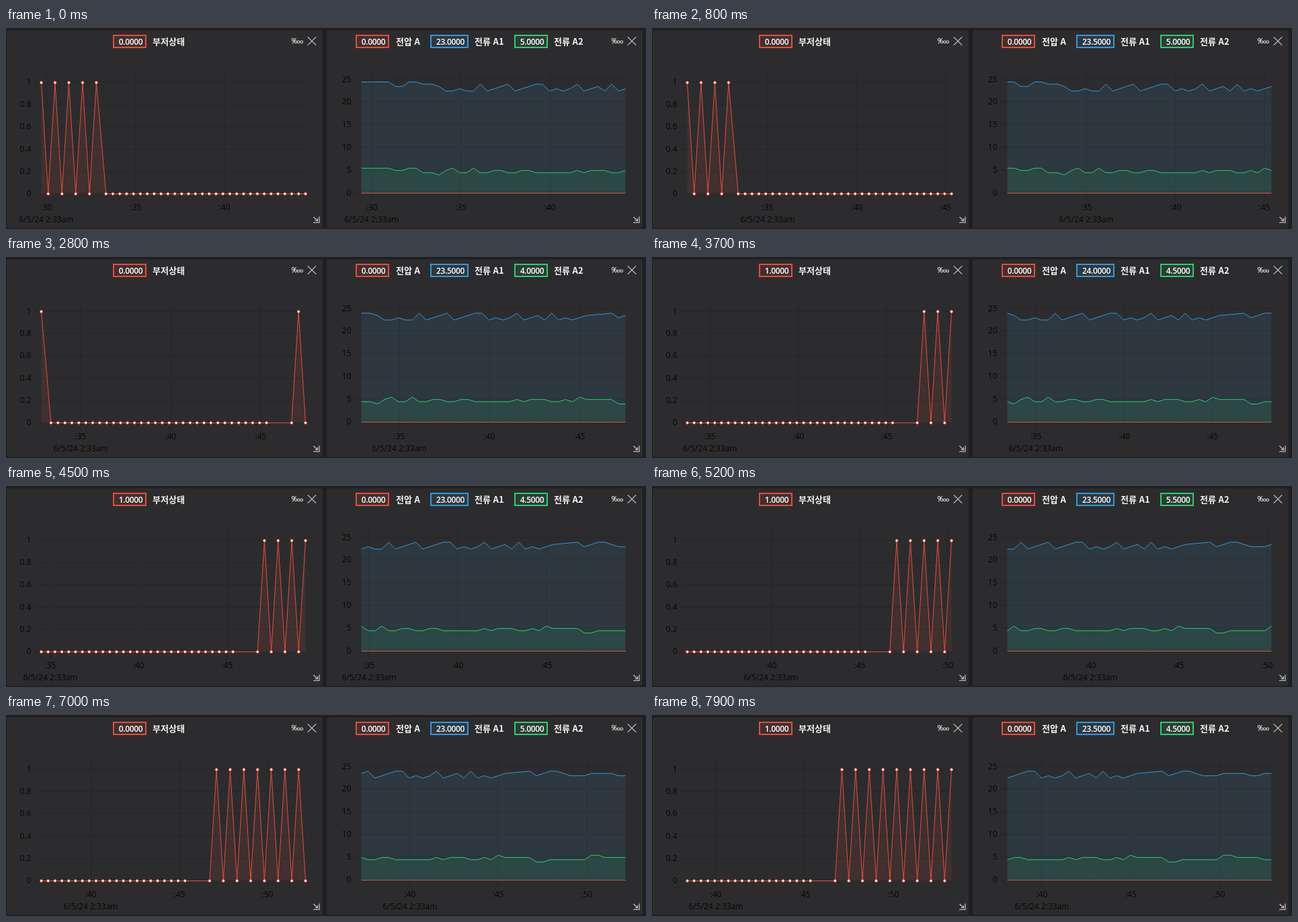
An HTML page that plays this animation: 952 by 300 pixels, repeating every 8000 ms.

```html
<!DOCTYPE html>
<html lang="ko">
<head>
<meta charset="utf-8">
<style>
html, body { margin: 0; width: 100%; height: 100%; overflow: hidden; background: #1f1f21; }
svg { display: block; }
text { font-family: "Open Sans", "Noto Sans CJK KR", "Noto Sans CJK", sans-serif; }
.axis { font-size: 12px; fill: #060606; }
.mid { text-anchor: middle; }
.end { text-anchor: end; }
.value { font-size: 12px; font-weight: 600; letter-spacing: -.35px; fill: #fff; text-anchor: middle; }
.name { font-family: "Noto Sans CJK KR", "Noto Sans CJK", "Open Sans", sans-serif; font-size: 13px; font-weight: 700; fill: #f4f4f4; }
.grid { stroke: #000; stroke-opacity: .09; stroke-width: 2; fill: none; }
.icon { stroke: #c8c8c8; stroke-width: 1.2; fill: none; }
</style>
</head>
<body>
<svg id="stage" width="952" height="300" viewBox="0 0 952 300"></svg>
<script>
const LOOP = 8000, SPAN = 15, WIDTH = 393, TOP = 64.5;
const SPEED = 1 / 900;    // seconds of data per ms of playback
const RED = '#e74c3c', BLUE = '#3498db', GREEN = '#2ecc71';

// readings fall into three runs, with a pause before each later run
const SECOND = 10, THIRD = 42;
const halves = v => Math.round(v * 2) / 2;
const dip = i => Math.abs(i - 5.5) < 1 ? 1 : 0;

// the buzzer beeps in the first and third run
const buzzer = i => i < SECOND ? i % 2 : i < THIRD ? 0 : (i - THIRD) % 2;

// plateau with a dip, then ramps that fall back, then a fading wave
const resets = [12, 13, 15, 16, 18, 22, 27, 29, 32, 35, 37, 39];
const spikes = [17, 31, 36];
function currentA1(i) {
  if (i < 12) return halves(24.5 - dip(i) - .3 * Math.max(0, i - 8));
  if (spikes.includes(i)) return 24;
  if (i <= THIRD) return Math.min(24, 22.5 + .5 * (i - resets.findLast(r => r <= i)));
  const fade = .5 * Math.exp((45 - i) / 12);
  return halves(23.38 + fade * Math.cos((i - 45.5) / 6.7 * 2 * Math.PI));
}

// two levels that swap at the toggles, with a few steps above and below
const toggles = [0, 9, 12, 14, 16, 17, 19, 21, 23, 25, 31, 32, 33, 36, 38, 39, 40, 43, 51, 57];
const above = [13, 16, 40, 51, 52], below = [11, 43, 44];
function currentA2(i) {
  const level = 4.5 + .5 * (toggles.filter(t => t <= i).length % 2);
  if (i < 9) return level + .5 - .5 * dip(i);
  return level + .5 * above.includes(i) - .5 * below.includes(i);
}

// seconds past the minute at which a reading was taken
function stamp(p, i) {
  if (i < SECOND) return p.start + p.step * i;
  return p.delay + (i < THIRD ? 33.34 + .3867 * (i - SECOND) : 46.72 + .387 * (i - THIRD));
}

const left = {
  x: 0, x0: 52.5, base: 247.5, dots: true,
  start: 29.317, step: .387, delay: 0, clock: 44.556,
  unit: 166, mark: .2,
  series: [{ color: RED, at: buzzer, box: 160, name: '부저상태', nameX: 218 }]
};
const right = {
  x: 476, x0: 528.5, base: 246.5, dots: false,
  start: 29.43, step: .383, delay: .05, clock: 44.5,
  unit: 6.776, mark: 5,
  series: [
    { color: RED, at: () => 0, box: 521, name: '전압 A', nameX: 580 },
    { color: BLUE, at: currentA1, box: 632, name: '전류 A1', nameX: 697 },
    { color: GREEN, at: currentA2, box: 757, name: '전류 A2', nameX: 815 }
  ]
};

const label = (x, y, cls, s) => `<text class="${cls}" x="${x}" y="${y}">${s}</text>`;
const path = (d, attrs) => `<path d="${d}" ${attrs}/>`;
const circle = (x, y, r, attrs = '') => `<circle cx="${x.toFixed(2)}" cy="${y}" r="${r}" ${attrs}/>`;

function frame(x) {
  const rings = [431, 435.4, 439.8].map(cx => circle(cx, 20.8, 1.8)).join('');
  return `<rect x="${x + 1}" y="3.5" width="470" height="295" rx="3" fill="#2c2c2e"/>
    <g class="icon" transform="translate(${x})">${circle(427, 17.5, 1.8)}${rings}
    <path d="M431.5 15L426 23.5M448.8 13.3L461.2 25.7M461.2 13.3L448.8 25.7"/>
    <path d="M457.5 282L463.5 288M463.5 284V288H459.5M466 281.5V290.5H457"/></g>`;
}

function legend(s, value) {
  const text = value.toFixed(4), w = text.length > 6 ? 55 : 48;
  return `<rect x="${s.box}" y="11" width="${w}" height="18" fill="${s.color}" fill-opacity=".1" stroke="${s.color}" stroke-width="2"/>`
    + label(s.box + w / 2 + 1.5, 24.5, 'value', text) + label(s.nameX, 24.5, 'name', s.name);
}

function axes(p, start, end, px, py) {
  let grid = '', labels = '';
  for (let k = 0; k <= 5; k++) {
    const y = Math.round(py(k * p.mark) - .5);
    grid += `M${p.x0 - 10} ${y}H${p.x0 + WIDTH}`;
    labels += label(p.x0 - 15, y + 4, 'axis end', +(k * p.mark).toFixed(1));
  }
  const first = Math.ceil(start / 5) * 5;
  for (let t = first; t <= end; t += 5) {
    const x = Math.round(px(t));
    grid += `M${x} ${TOP}V257`;
    labels += label(x, 272, 'axis mid', ':' + t);
  }
  return path(grid, 'class="grid"') + labels
    + label(Math.round(px(first)), 290, 'axis mid', '6/5/24 2:33am');
}

function plot(p, s, from, last, px, py) {
  const pts = [];
  for (let i = from; i <= last; i++) pts.push([px(stamp(p, i)), py(s.at(i))]);
  const line = 'M' + pts.map(([x, y]) => x.toFixed(2) + ' ' + y.toFixed(2)).join('L');
  const dots = p.dots ? pts.map(([x, y]) => circle(x, y, 2, `fill="#fff" stroke="${s.color}"`)) : [];
  return path(`${line}V${p.base}H${p.x0}Z`, `fill="${s.color}" fill-opacity=".1"`)
    + path(line, `fill="none" stroke="${s.color}" stroke-linejoin="round"`)
    + dots.join('') + legend(s, s.at(last));
}

function chart(p, now) {
  const clock = p.clock + Math.floor(now / 100) * 100 * SPEED;
  let last = 0, from = 0;
  while (stamp(p, last + 1) <= clock) last++;
  const end = stamp(p, last);
  while (stamp(p, from) < end - SPAN) from++;
  const start = stamp(p, from);
  const px = t => p.x0 + (t - start) / (end - start) * WIDTH;
  const py = v => p.base - v * p.unit;
  return frame(p.x) + axes(p, start, end, px, py)
    + p.series.map(s => plot(p, s, from, last, px, py)).join('');
}

const stage = document.getElementById('stage');
let shown = '';
function draw() {
  const now = performance.now() % LOOP;
  const art = chart(left, now) + chart(right, now);
  if (art !== shown) stage.innerHTML = shown = art;
  requestAnimationFrame(draw);
}
draw();
</script>
</body>
</html>
```
